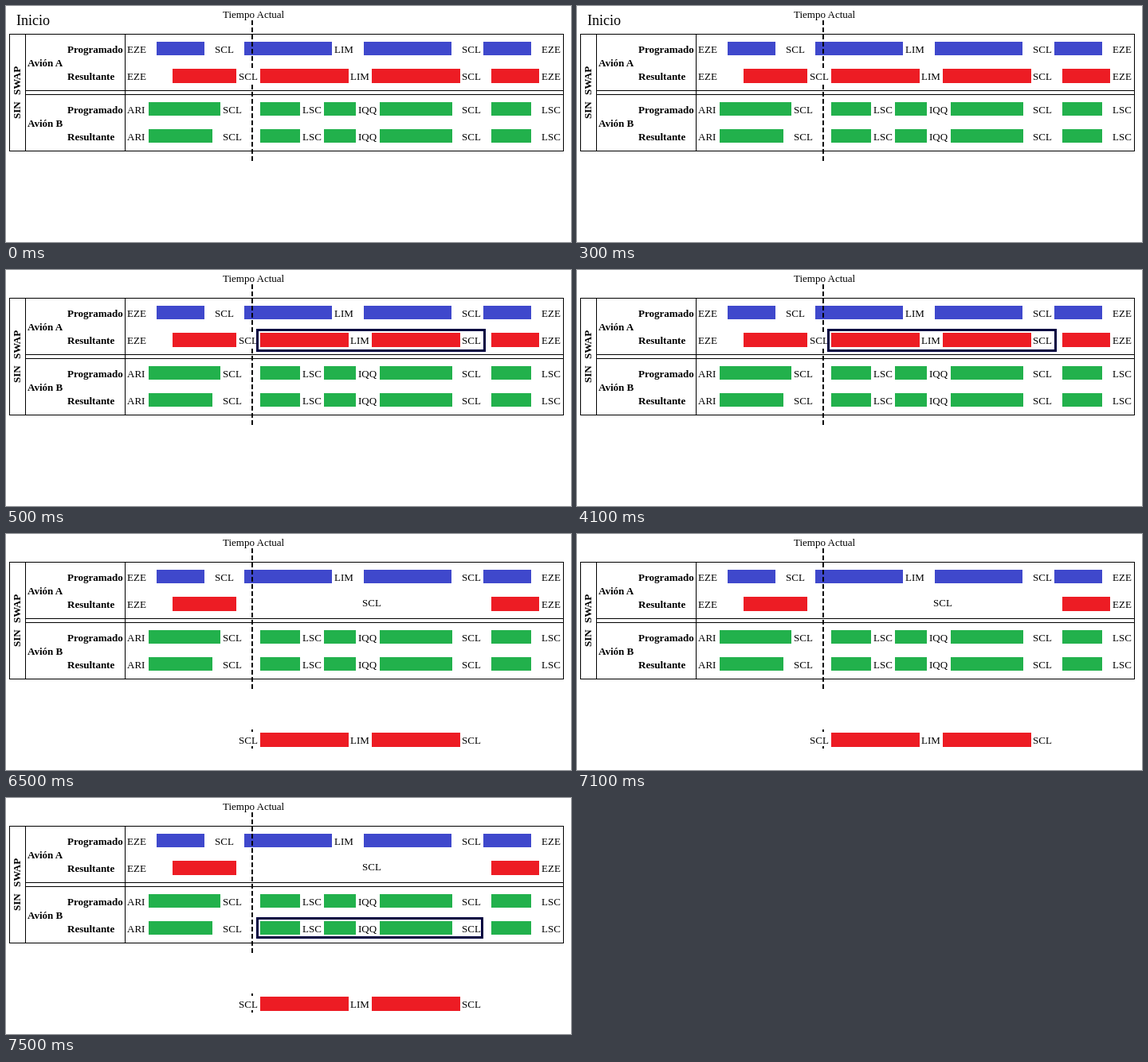
Write an HTML page that moves like this. It is 709 px wide and 297 px high and loops after 8000 ms.

```html
<!DOCTYPE html>
<html lang="es">
<head>
<meta charset="utf-8">
<title>Asignación de vuelos</title>
<style>
  html, body { margin: 0; width: 100%; height: 100%; overflow: hidden; background: #fff; }
  svg { display: block; width: 709px; height: 297px; }
  text { font: 13px "Liberation Serif", "Times New Roman", serif; fill: #000; white-space: pre; }
  .title { font-size: 18px; }
  .bold text { font-weight: bold; }
  .grid { fill: none; stroke: #000; shape-rendering: crispEdges; }
  .now { stroke: #000; stroke-width: 2; stroke-dasharray: 6 3; }
  .blue { fill: #3f48cc; }
  .red { fill: #ed1c24; }
  .green { fill: #22b14c; }
  .frame { fill: none; stroke: #000040; stroke-width: 3; }
  .intro, .pick, .assigned, .removed, .target { animation: 8s step-end infinite; }
  .intro { animation-name: intro; }
  .pick { animation-name: pick; }
  .assigned { animation-name: assigned; }
  .removed { animation-name: removed; }
  .target { animation-name: target; }
  @keyframes intro { 0% { visibility: visible } 6.25%, 100% { visibility: hidden } }
  @keyframes pick { 0%, 81.25%, 100% { visibility: hidden } 6.25% { visibility: visible } }
  @keyframes assigned { 0% { visibility: visible } 81.25%, 100% { visibility: hidden } }
  @keyframes removed { 0% { visibility: hidden } 81.25%, 100% { visibility: visible } }
  @keyframes target { 0% { visibility: hidden } 93.75%, 100% { visibility: visible } }
</style>
</head>
<body>
<svg viewBox="0 0 709 297">
  <path class="grid" d="M4.5 35.5H699.5V182.5H4.5ZM24.5 35.5V182.5M149.5 35.5V182.5M24.5 106.5H699.5M24.5 111.5H699.5"/>
  <text class="title intro" x="13" y="24">Inicio</text>
  <text x="272" y="15">Tiempo Actual</text>
  <g class="bold">
    <text transform="translate(18 142) rotate(-90)">SIN</text>
    <text transform="translate(18 112) rotate(-90)">SWAP</text>
    <text x="27" y="76">Avión A</text>
    <text x="27" y="152">Avión B</text>
    <text x="77" y="59">Programado</text>
    <text x="77" y="93">Resultante</text>
    <text x="77" y="135">Programado</text>
    <text x="77" y="169">Resultante</text>
  </g>
  <g id="flights"></g>
  <path class="now" d="M309 18V196"/>
  <g id="leg"></g>
  <rect class="frame pick" x="315.5" y="75.5" width="285" height="26"/>
  <rect class="frame target" x="315.5" y="151.5" width="282" height="24"/>
</svg>
<script>
  const bar = (color, y, height = 17) => ([x, end]) =>
    `<rect class="${color}" x="${x}" y="${y}" width="${end - x}" height="${height}"/>`;
  const label = y => ([x, code]) => `<text x="${x}" y="${y}">${code}</text>`;
  const row = (color, y, bars, codes, height) =>
    bars.map(bar(color, y, height)).join('') + codes.map(label(y + 14)).join('');

  const shared = [[319, 369], [399, 439], [469, 560], [609, 659]];
  const stops = [[152, 'ARI'], [272, 'SCL'], [372, 'LSC'], [442, 'IQQ'], [572, 'SCL'], [672, 'LSC']];

  document.getElementById('flights').innerHTML =
    row('blue', 45, [[189, 249], [299, 409], [449, 559], [599, 659]],
      [[152, 'EZE'], [262, 'SCL'], [412, 'LIM'], [572, 'SCL'], [672, 'EZE']]) +
    row('red', 79, [[209, 289], [609, 669]], [[152, 'EZE'], [672, 'EZE']], 18) +
    row('green', 121, [[179, 269], ...shared], stops) +
    row('green', 155, [[179, 259], ...shared], stops);

  // The round trip that leaves the schedule, with a clear patch behind its first stop.
  const trip = y => `<rect x="292" y="${y + 2}" width="23" height="15" fill="#fff"/>` +
    row('red', y, [[319, 430], [459, 570]], [[292, 'SCL'], [432, 'LIM'], [572, 'SCL']], 18);

  document.getElementById('leg').innerHTML =
    `<g class="assigned">${trip(79)}</g>` +
    `<g class="removed"><path d="M309 246V249M309 267V270" stroke="#000" stroke-width="2"/>` +
    `${trip(250)}${label(91)([447, 'SCL'])}</g>`;
</script>
</body>
</html>
```
